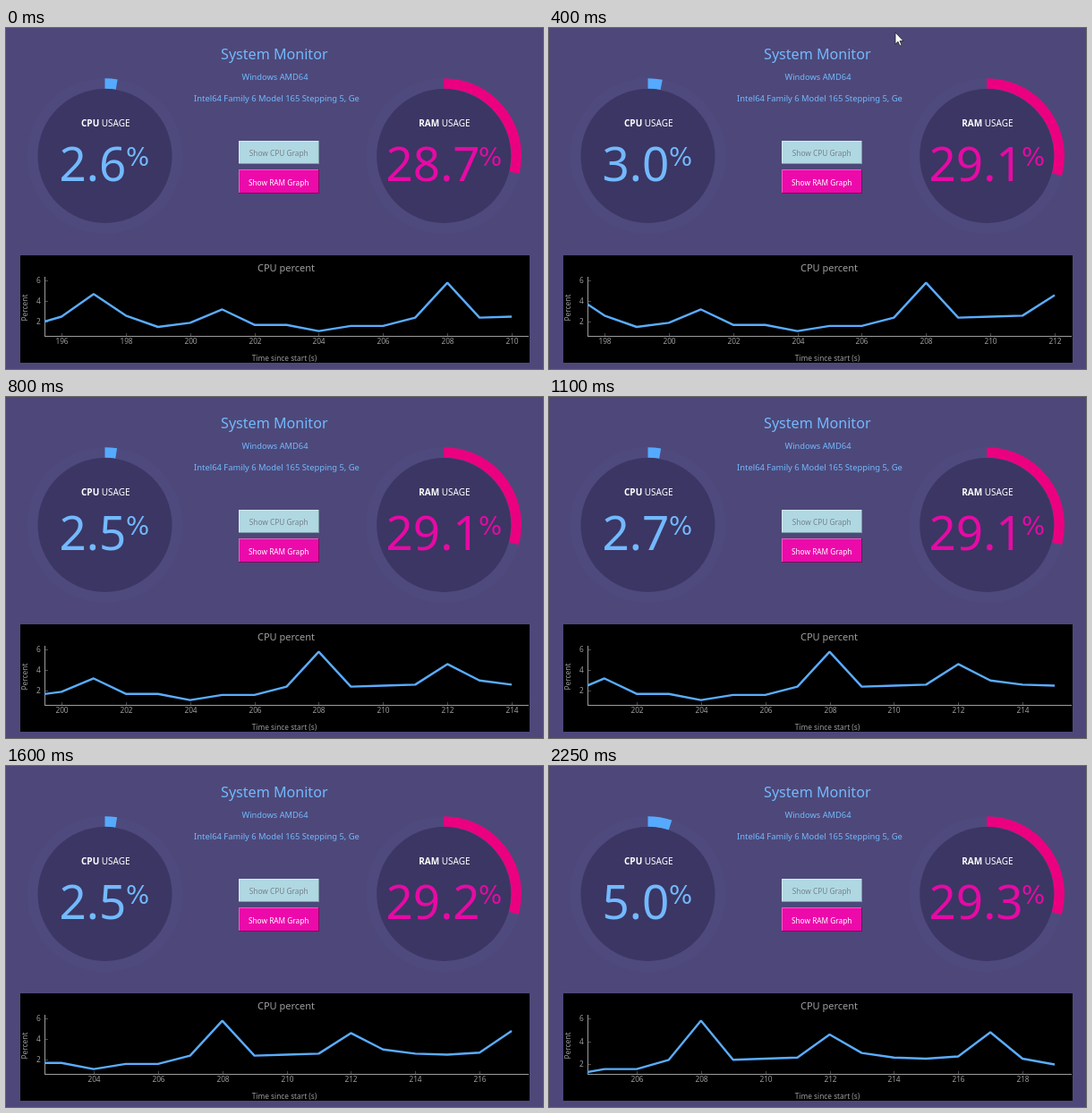
Animation of 600x381 px, one loop 2.3 s. Source, as an HTML page with a canvas:

```html
<!DOCTYPE html>
<html lang="en">
<head>
<meta charset="utf-8">
<title>System Monitor</title>
<style>
html, body { margin: 0; width: 100%; height: 100%; overflow: hidden; background: #4d4879; }
canvas { display: block; width: 600px; height: 381px; }
</style>
</head>
<body>
<canvas id="stage" width="600" height="381"></canvas>
<script>
const ctx = document.getElementById('stage').getContext('2d');
const LOOP = 2300, TICK = 250, LEAD = 200;
const BLUE = '#73b9ff', PINK = '#e60aa5', GREY = '#9c9c9c';
const SANS = '"Noto Sans", "Open Sans", sans-serif';
const WIDE = '"DejaVu Sans", sans-serif';

// One CPU reading per second, starting at second 195.
const FIRST = 195, SPAN = 14;
const cpu = [1.6, 2.5, 4.7, 2.6, 1.5, 1.9, 3.2, 1.7, 1.7, 1.1, 1.6, 1.6, 2.4,
  5.8, 2.4, 2.5, 2.6, 4.6, 3.0, 2.6, 2.5, 2.7, 4.8, 2.5, 2.0, 5.0];
const ram = [28.7, 29.0, 29.1, 29.1, 29.1, 29.1, 29.1, 29.2, 29.2, 29.3];

function text(str, x, y, size, color, align = 'center', weight = 400, family = SANS) {
  ctx.font = `${weight} ${size}px ${family}`;
  ctx.textAlign = align;
  ctx.fillStyle = color;
  ctx.fillText(str, x, y);
  return ctx.measureText(str).width;
}

function box(x, y, w, h, color) {
  ctx.fillStyle = color;
  ctx.fillRect(x, y, w, h);
}

function disc(x, y, r, color) {
  ctx.fillStyle = color;
  ctx.beginPath();
  ctx.arc(x, y, r, 0, Math.PI * 2);
  ctx.fill();
}

function gauge(x, name, value, arcColor, color, numX, pctX) {
  const y = 143, top = -Math.PI / 2;
  disc(x, y, 87, '#4f4a7d');
  ctx.strokeStyle = arcColor;
  ctx.lineWidth = 11.5;
  ctx.beginPath();
  ctx.arc(x, y, 81, top, top + value / 100 * Math.PI * 2);
  ctx.stroke();
  disc(x, y, 75, '#3b3663');

  const left = x - (name === 'CPU' ? 26.5 : 28);
  const w = text(name, left, 109.7, 10, '#fff', 'left', 700);
  text('USAGE', left + w + 2.6, 109.7, 10, '#fff', 'left');
  text(value.toFixed(1), numX, 170.5, 53, color, 'left', 500);
  text('%', pctX, 154, 27.5, color, 'left', 400, WIDE);
}

function button(label, y, h, face, light, dark, ink) {
  box(260, y, 90, h, dark);
  box(260, y, 89, h - 1, light);
  box(261, y + 1, 88, h - 2, face);
  text(label, 304.7, y + h / 2 + 4.4, 8.3, ink);
}

function chart(last) {
  const start = last - SPAN;
  const at = s => cpu[s - FIRST];
  const shown = cpu.slice(start - FIRST, last - FIRST + 1);
  const lo = Math.min(...shown), hi = Math.max(...shown);
  const px = s => 62 + (s - start) * 503 / SPAN;
  const py = v => 338.6 - (v - lo) / (hi - lo) * 54;

  box(16, 254, 569, 120, '#000');
  text('CPU percent', 313, 271.5, 11, GREY);
  text('Time since start (s)', 311, 371.5, 8.3, GREY);
  ctx.save();
  ctx.translate(24.3, 312.5);
  ctx.rotate(-Math.PI / 2);
  text('Percent', 0, 0, 8.4, GREY);
  ctx.restore();

  box(43, 278, 1, 67, GREY);
  box(43, 344, 541, 1, GREY);
  for (let v = 2; v <= 6; v += 2) {
    const y = Math.round(py(v));
    box(44, y, 3, 1, '#4a4a4a');
    text(v, 38.8, y + 3.2, 8.3, GREY, 'right');
  }
  for (let s = start + start % 2; s <= last; s += 2) {
    const x = Math.round(px(s));
    box(x, 341, 1, 3, '#4a4a4a');
    text(s, x + 0.5, 352.7, 8.3, GREY);
  }

  ctx.save();
  ctx.beginPath();
  ctx.rect(43, 278, 541, 66);
  ctx.clip();
  ctx.strokeStyle = '#5aadff';
  ctx.lineWidth = 2.4;
  ctx.lineJoin = 'bevel';
  ctx.beginPath();
  for (let s = start - 1; s <= last; s++) ctx.lineTo(px(s), py(at(s)));
  ctx.stroke();
  ctx.restore();
}

function cursor(x, y) {
  ctx.beginPath();
  for (const [dx, dy] of [[0, 0], [0, 13], [3, 10.2], [5, 15], [7, 14], [5, 9.5], [9, 9.5]])
    ctx.lineTo(x + dx, y + dy);
  ctx.closePath();
  ctx.fillStyle = '#fff';
  ctx.fill();
  ctx.strokeStyle = '#222';
  ctx.lineWidth = 0.8;
  ctx.stroke();
}

function draw(t) {
  const n = Math.floor((t + LEAD) / TICK);
  const last = 210 + n;
  box(0, 0, 600, 381, '#4d4879');
  text('System Monitor', 299.8, 35, 16.1, BLUE);
  text('Windows AMD64', 300.5, 58, 9.3, BLUE);
  text('Intel64 Family 6 Model 165 Stepping 5, Ge', 302.5, 81.5, 9.4, BLUE);
  // The dials already show the reading the chart plots next.
  gauge(110.5, 'CPU', cpu[last + 1 - FIRST], '#55aaff', BLUE, 59.5, 134);
  gauge(489.2, 'RAM', ram[n], '#eb0080', PINK, 424.5, 528);
  button('Show CPU Graph', 126, 26, '#b0d8e2', '#d3e9ee', '#7d9aa6', '#75828b');
  button('Show RAM Graph', 158, 27, '#ec0aaa', '#f35cc8', '#7c0a61', '#fff');
  chart(last);
  if (t >= 400 && t < 450) cursor(387, 5);
}

function loop(now) {
  draw(now % LOOP);
  requestAnimationFrame(loop);
}
requestAnimationFrame(loop);
</script>
</body>
</html>
```
